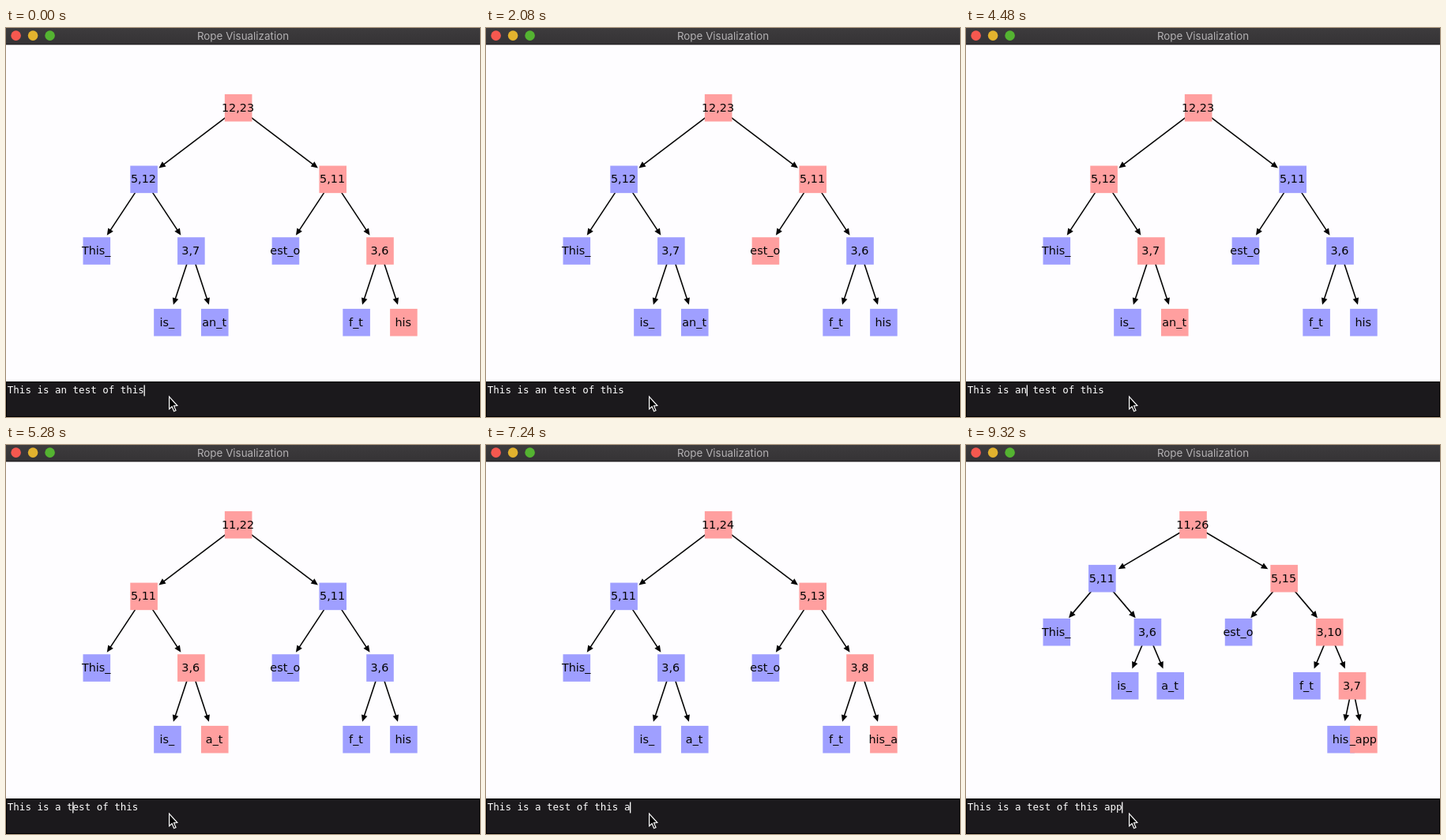
An HTML page with a canvas that plays this animation: 600 px wide and 493 px high, repeating every 9.36 s.

```html
<!DOCTYPE html>
<html lang="en">
<head>
<meta charset="utf-8">
<title>Rope Visualization</title>
<style>
  html, body { margin: 0; width: 100%; height: 100%; overflow: hidden; background: #fefdff; }
  canvas { display: block; width: 600px; height: 493px; }
</style>
</head>
<body>
<canvas id="stage"></canvas>
<script>
const W = 600, H = 493, LOOP = 9360;
const BLUE = '#9f9fff', RED = '#ff9f9f', INK = '#050505';
const BOX = 34.6, LEFT = 114.8, RIGHT = 503.4, TOP = 101.2, BOTTOM = 373.2;
const CHAR = 7.526, BLINK = 490, DELETE_AT = 5000;

const canvas = document.getElementById('stage');
const ctx = canvas.getContext('2d');
const dpr = window.devicePixelRatio || 1;
canvas.width = W * dpr;
canvas.height = H * dpr;

// The caret walks from one column to another, one column per step.
const walks = [
  { from: 23, to: 7, start: 400, step: 180 },
  { from: 7, to: 10, start: 3700, step: 200 },
  { from: 9, to: 22, start: 5120, step: 125 }
];
const typed = [[6900, '_'], [7200, 'a'], [7500, 'p'], [8160, 'p']];

function caretColumn(t) {
  if (t >= typed[0][0]) return 22 + typed.filter(([at]) => t >= at).length;
  if (t >= DELETE_AT && t < walks[2].start) return 9;
  const { from, to, start, step } = walks.filter(w => t >= w.start).pop() || walks[0];
  const steps = Math.max(0, Math.floor((t - start) / step) + 1);
  return from + Math.sign(to - from) * Math.min(steps, Math.abs(to - from));
}

function caretVisible(t) {
  const phase = t < DELETE_AT ? t + 426 : t - DELETE_AT;
  return Math.floor(phase / BLINK) % 2 === 0;
}

// Leaves are strings, inner nodes are pairs; a leaf longer than five splits.
function ropeAt(t) {
  const tail = 'his' + typed.filter(([at]) => t >= at).map(k => k[1]).join('');
  const last = tail.length > 5 ? [tail.slice(0, 3), tail.slice(3)] : tail;
  const word = t < DELETE_AT ? 'an_t' : 'a_t';
  return [['This_', ['is_', word]], ['est_o', ['f_t', last]]];
}

const flat = node => typeof node === 'string' ? node : node.map(flat).join('');

function layout(rope, column) {
  const nodes = [];
  function add(rope, x, depth, start, parent) {
    const leaf = typeof rope === 'string';
    const text = flat(rope), end = start + text.length;
    const node = { x, depth, parent, label: text, active: column > start && column <= end };
    nodes.push(node);
    if (leaf) return;
    const weight = flat(rope[0]).length, shift = 0.5 ** (depth + 1);
    node.label = weight + ',' + text.length;
    add(rope[0], x - shift, depth + 1, start, node);
    add(rope[1], x + shift, depth + 1, start + weight, node);
  }
  add(rope, 0, 0, 0, null);
  const xs = nodes.map(n => n.x);
  const min = Math.min(...xs), max = Math.max(...xs);
  const deepest = Math.max(...nodes.map(n => n.depth));
  for (const n of nodes) {
    n.x = LEFT + (n.x - min) / (max - min) * (RIGHT - LEFT);
    n.y = TOP + n.depth / deepest * (BOTTOM - TOP);
  }
  return nodes;
}

function polygon(points) {
  ctx.beginPath();
  points.forEach(([x, y]) => ctx.lineTo(x, y));
  ctx.closePath();
}

function drawArrow(a, b) {
  const angle = Math.atan2(b.y - a.y, b.x - a.x);
  const tip = Math.hypot(b.x - a.x, b.y - a.y) - 23.6;
  ctx.save();
  ctx.translate(a.x, a.y);
  ctx.rotate(angle);
  ctx.strokeStyle = ctx.fillStyle = INK;
  ctx.lineWidth = 1.6;
  ctx.beginPath();
  ctx.moveTo(0, 0);
  ctx.lineTo(tip - 5, 0);
  ctx.stroke();
  polygon([[tip, 0], [tip - 8.6, -3.9], [tip - 8.6, 3.9]]);
  ctx.fill();
  ctx.restore();
}

function drawTree(nodes) {
  for (const n of nodes) if (n.parent) drawArrow(n.parent, n);
  for (const n of nodes) {
    ctx.fillStyle = n.active ? RED : BLUE;
    ctx.fillRect(n.x - BOX / 2, n.y - BOX / 2, BOX, BOX);
  }
  ctx.fillStyle = INK;
  ctx.font = '14.4px "DejaVu Sans", sans-serif';
  ctx.textAlign = 'center';
  for (const n of nodes) ctx.fillText(n.label, n.x - 0.6, n.y + 4.6);
}

function drawTitleBar() {
  const shade = ctx.createLinearGradient(0, 0, 0, 21);
  shade.addColorStop(0, '#3d3b3d');
  shade.addColorStop(1, '#353335');
  ctx.fillStyle = shade;
  ctx.fillRect(0, 0, W, 21);
  ctx.fillStyle = '#1c1a1c';
  ctx.fillRect(0, 20.3, W, 1);
  ['#f6584f', '#e2b22e', '#54b331'].forEach((color, i) => {
    ctx.fillStyle = color;
    ctx.beginPath();
    ctx.arc(12.6 + i * 21.5, 9.6, 6.3, 0, 7);
    ctx.fill();
  });
  ctx.fillStyle = '#b3b1b3';
  ctx.font = '13.4px Inter, sans-serif';
  ctx.textAlign = 'center';
  ctx.fillText('Rope Visualization', 300, 14.8);
}

function drawEditor(text, column, caret) {
  ctx.fillStyle = '#000';
  ctx.fillRect(0, 448, W, 45);
  ctx.fillStyle = '#1b191c';
  ctx.fillRect(1, 449.5, W - 2, 42.5);
  ctx.fillStyle = '#fff';
  ctx.font = '12.5px "DejaVu Sans Mono", monospace';
  ctx.textAlign = 'left';
  ctx.fillText(text, 1.8, 463);
  if (caret) ctx.fillRect(1.4 + column * CHAR, 452.5, 1.3, 14);
}

function drawPointer() {
  polygon([[206.6, 467.4], [206.6, 483], [210.1, 479.8], [212.6, 485.7],
           [215, 484.7], [212.5, 478.9], [216.8, 478.6]]);
  ctx.fillStyle = '#000';
  ctx.fill();
  ctx.strokeStyle = '#fff';
  ctx.lineWidth = 1.2;
  ctx.stroke();
}

function draw(t) {
  const rope = ropeAt(t), column = caretColumn(t);
  ctx.setTransform(dpr, 0, 0, dpr, 0, 0);
  ctx.fillStyle = '#fefdff';
  ctx.fillRect(0, 0, W, H);
  drawTree(layout(rope, column));
  drawTitleBar();
  drawEditor(flat(rope).replace(/_/g, ' '), column, caretVisible(t));
  drawPointer();
}

const begin = performance.now();
function tick() {
  draw((performance.now() - begin) % LOOP);
  requestAnimationFrame(tick);
}
tick();
</script>
</body>
</html>
```
